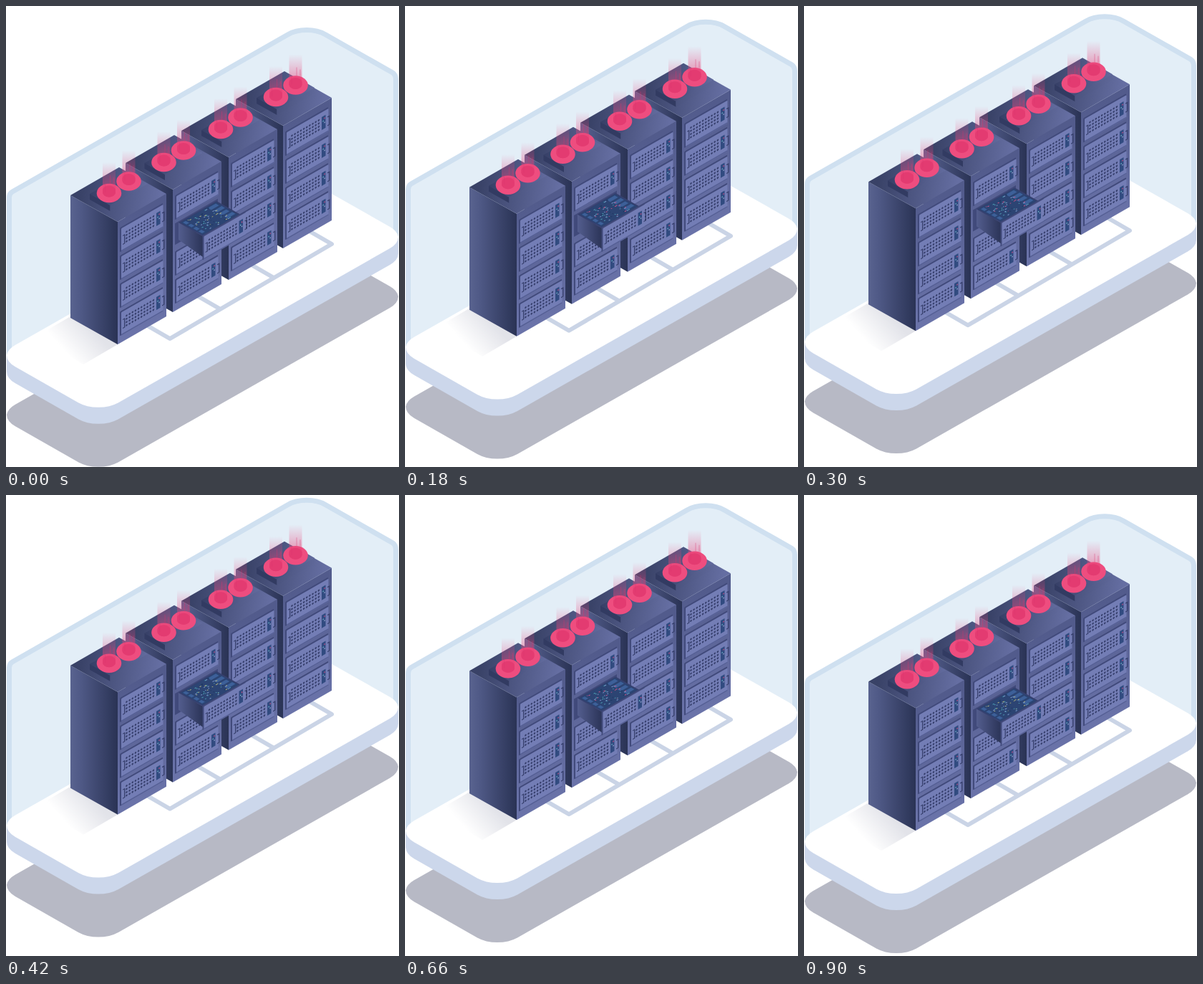
These frames come from a looping animation (549 px wide and 643 px high, 0.96 s). An HTML page:

```html
<!DOCTYPE html>
<html lang="en">
<head>
<meta charset="utf-8">
<title>Server racks</title>
<style>
  html, body { margin: 0; height: 100%; overflow: hidden; background: #fff; }
  svg { display: block; }
</style>
</head>
<body>
<svg id="stage" width="549" height="643" viewBox="0 0 549 643"></svg>
<script>
const stage = document.getElementById('stage');
const STEP = 60, STEPS = 16, RISE = 3.75;

const times = (n, fn) => Array.from({ length: n }, (_, i) => fn(i)).join('');
const poly = (points, fill) => `<polygon points="${points}" fill="${fill}"/>`;
const rect = (x, y, w, h, fill, extra = '') =>
  `<rect x="${x}" y="${y}" width="${w}" height="${h}" fill="${fill}" ${extra}/>`;
const gradient = (id, coords, ...stops) => {
  const [x1, y1, x2, y2] = coords;
  const marks = stops.map(([at, color, alpha = 1]) =>
    `<stop offset="${at}" stop-color="${color}" stop-opacity="${alpha}"/>`).join('');
  return `<linearGradient id="${id}" gradientUnits="userSpaceOnUse"
    x1="${x1}" y1="${y1}" x2="${x2}" y2="${y2}">${marks}</linearGradient>`;
};

let seed = 11;
const random = () => (seed = seed * 16807 % 2147483647) / 2147483647;

// Server front, in flat coordinates of the rack's right face
const panel = `<g id="panel">
  ${rect(3, 10, 60, 34, '#414a7b', 'rx="1"')}
  ${rect(5, 12.3, 58.5, 32, '#737db5', 'rx="1"')}
  ${rect(5, 42.6, 58.5, 1.7, '#555f94')}
  ${times(40, i => `<circle cx="${12.5 + (i % 10) * 4.15}" cy="${21 + (i / 10 | 0) * 4.5}" r="1.25" fill="#323b68"/>`)}
  <path d="M7 23.5h2.7v12H7M62 23.5h2.8v12H62" fill="none" stroke="#333c69" stroke-width="1.2"/>
  ${rect(54, 19, 5.5, 18, '#314b80')}
  ${rect(57.5, 22, 1.2, 1.5, '#e34d83')}
  ${rect(55.5, 25, 1.2, 1.5, '#79c7d4')}
  ${rect(57.5, 28, 1.2, 1.5, '#a9b8df')}
</g>`;

// Fan with a glow that fades upwards, centred on its disc
const fan = `<g id="fan">
  <ellipse rx="17.3" ry="13.2" fill="#ee4d7f"/>
  <path d="M-9-43H9V-1A9 6.5 0 0 1-9-1Z" fill="url(#glow)"/>
  <path d="M-9-4A9 6.5 0 0 1 9-4V-1A9 6.5 0 0 1-9-1Z" fill="#e33b71"/>
  <path d="M1.5-25V-13M6.5-22V-13M-5.5-12V-1" stroke="#d9336d" stroke-width=".8" opacity=".5"/>
</g>`;

const cabinet = `<g id="cabinet">
  ${poly('90,264 156,301 156,472 90,435', 'url(#side)')}
  ${poly('156,301 224,262 224,433 156,472', 'url(#front)')}
  ${poly('90,264 158,225 224,262 156,301', 'url(#roof)')}
</g>`;

const cooler = `<g id="cooler">
  ${poly('117,262 145.5,278 145.5,286 117,270', '#323b62')}
  ${poly('145.5,278 198,248 198,256 145.5,286', 'url(#roof)')}
  ${poly('117,262 170,232 198,248 145.5,278', 'url(#base)')}
  <use href="#fan" x="171.5" y="244.5"/>
  <use href="#fan" x="144" y="261"/>
</g>`;

// Back to front; the coolers do not sit exactly alike on their racks
const racks = [
  { x: 231, y: -134, coolerX: 233, coolerY: -134 },
  { x: 155, y: -90, coolerX: 156, coolerY: -89 },
  { x: 77, y: -45, coolerX: 76.5, coolerY: -43, open: true },
  { x: 0, y: 0, coolerX: 0, coolerY: 0 },
];
const face = 'matrix(1 -.574 0 1 156 301)';
const rack = ({ x, y, coolerX, coolerY, open }) => `
  <use href="#cabinet" x="${x}" y="${y}"/>
  <use href="#cooler" x="${coolerX}" y="${coolerY}"/>
  <g transform="translate(${x} ${y}) ${face}">${times(4, row => open && row === 1
    ? rect(3, 49, 60, 30, '#414a7b')
    : `<use href="#panel" y="${row * 39}"/>`)}</g>`;

const chips = times(64, i => {
  const color = ['currentColor', '#4f9fb4', '#7f9bcd', '#1f3860'][i % 4];
  return rect(9 + random() * 32, 3 + random() * 27, 1 + random() * 1.4, 1, color);
});
const drawer = `
  ${poly('241,302 275,321 275,350 241,326', 'url(#drawerSide)')}
  ${poly('241,302 294,272 328,291 275,321', '#36406f')}
  <g transform="matrix(1 -.574 1 .56 241 302)">
    ${rect(1.5, 1.5, 49.5, 31, '#2c4473')}
    ${times(4, i => rect(3, 3 + i * 7.3, 4, 5, '#3d6099'))}
    ${times(4, i => rect(38 + i % 2, 3 + i * 7.3, 11, 4.6, '#3d6099'))}
    ${chips}
  </g>
  <g transform="translate(115.5 -28) ${face}"><use href="#panel" y="39"/></g>`;

const floorFront = (y, drop) => `M1 ${y}v${drop}a40 23 0 0 0 11.7 16L101 ${y + drop + 66.3}
  a40 23 0 0 0 56 0L536.3 ${y + drop - 149}a40 23 0 0 0 11.7-16v${-drop}`;
const floorBack = y => `A40 23 0 0 0 536.3 ${y - 179}L448 ${y - 229}
  a40 23 0 0 0-56 0L12.7 ${y - 14}A40 23 0 0 0 1 ${y}Z`;
const slab = (y, drop, fill) => `<path d="${floorFront(y, drop)}${floorBack(y)}" fill="${fill}"/>`;

stage.innerHTML = `<defs>
  ${gradient('side', [90, 0, 156, 0], [0, '#59638f'], [.2, '#505a87'], [1, '#2a3355'])}
  ${gradient('front', [165, 290, 200, 450], [0, '#525b8c'], [1, '#6a73a9'])}
  ${gradient('roof', [105, 250, 215, 265], [0, '#394267'], [1, '#656ea2'])}
  ${gradient('base', [117, 0, 198, 0], [0, '#363f66'], [1, '#626b9e'])}
  ${gradient('drawerSide', [241, 0, 275, 0], [0, '#535d8e'], [1, '#2b3458'])}
  ${gradient('glow', [0, -43, 0, 0], [0, '#ec4b80', 0], [.7, '#e8457a', .42], [1, '#e33b71', .9])}
  ${gradient('shade', [123, 453, 86, 486], [0, '#e2e3e9'], [1, '#ffffff'])}
  ${panel}${fan}${cabinet}${cooler}
</defs>
<g id="scene">
  ${slab(570, 0, '#b7b9c5')}
  ${slab(487, 23, '#ccd7eb')}
  <path d="M4.5 487V267Q4.5 261.5 9 259L393.5 40A37 21.3 0 0 1 446.5 40L540 93Q544.5 96 544.5 102V322"
    fill="#e3eef7" stroke="#cfe0f0" stroke-width="7"/>
  ${slab(487, 0, '#fff')}
  ${poly('90,433 156,472 108,500 42,461', 'url(#shade)')}
  <path d="M196 445L229 464L455 332L422 313M265 403L298 422M341 360L374 379"
    fill="none" stroke="#cad4e6" stroke-width="6" stroke-linejoin="round"/>
  ${racks.map(rack).join('')}
  ${drawer}
</g>`;

const scene = document.getElementById('scene');
function draw() {
  const step = Math.floor(performance.now() / STEP) % STEPS;
  const height = Math.min(step, STEPS - step);
  scene.setAttribute('transform', `translate(0 ${-RISE * height})`);
  scene.style.color = height > 1 && height < 7 ? '#d0588f' : '#b9b984';
  requestAnimationFrame(draw);
}
draw();
</script>
</body>
</html>
```
